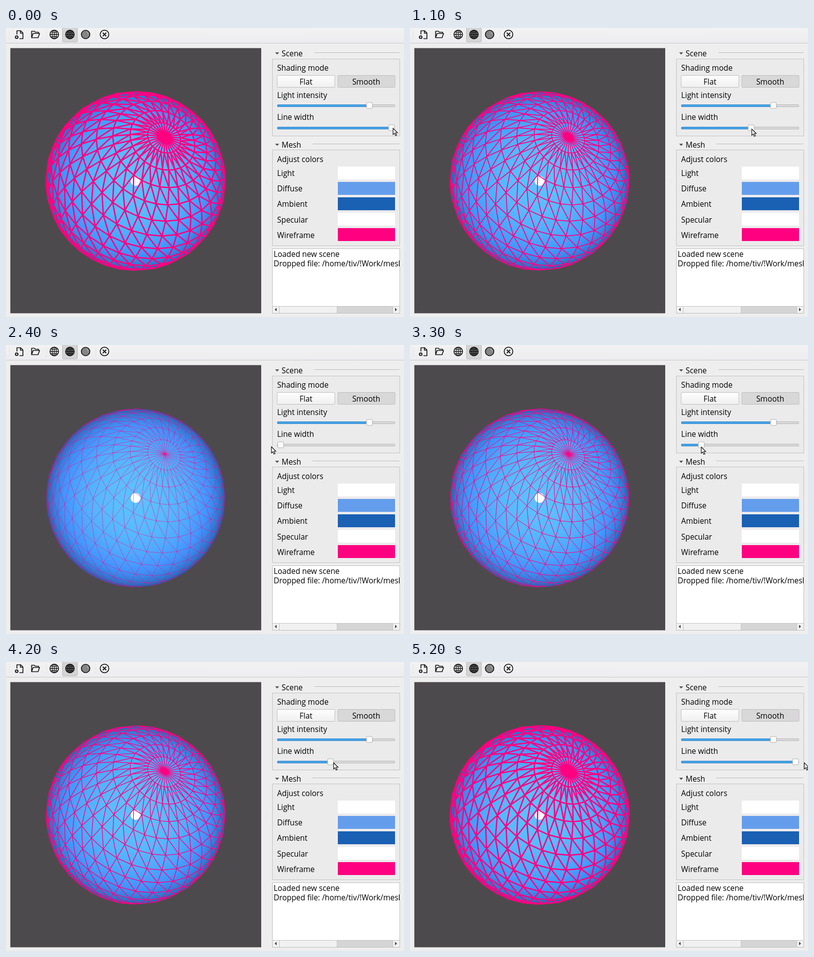
These frames come from a looping animation (800 by 582 pixels, 5300 ms). An HTML page:

```html
<!DOCTYPE html>
<html lang="en">
<head>
<meta charset="utf-8">
<title>Mesh viewer</title>
<style>
  html, body { margin: 0; width: 100%; height: 100%; overflow: hidden; background: #efeeef; }
  svg { display: block; width: 100vw; height: 100vh; }
  text { font: 500 15.4px "Open Sans", "Noto Sans", sans-serif; fill: #000; }
  .mid { text-anchor: middle; }
  .frame { fill: #ecebec; stroke: #c3c2c3; }
  .icon { fill: none; stroke: #151515; stroke-width: 1.7; stroke-linejoin: round; }
</style>
</head>
<body>
<svg viewBox="0 0 800 582">
  <defs>
    <radialGradient id="shade"></radialGradient>
    <linearGradient id="bar" x2="0" y2="1">
      <stop stop-color="#f3f2f3"/><stop offset="1" stop-color="#edecee"/>
    </linearGradient>
    <linearGradient id="button" x2="0" y2="1">
      <stop stop-color="#fdfdfd"/><stop offset="1" stop-color="#f0f0f0"/>
    </linearGradient>
    <clipPath id="logClip"><path d="M536 445H791V560H536z"/></clipPath>
    <g id="globe" class="icon">
      <circle r="8.6"/>
      <g stroke-width="1.3">
        <ellipse rx="4.4" ry="8.6"/>
        <path d="M0-8.6V8.6M-8.6 0H8.6M-7-5Q0-2.800 7-5M-7 5Q0 2.800 7 5"/>
      </g>
    </g>
    <g id="slider">
      <rect x="545.5" y="-2" width="236" height="4" rx="1.5" fill="#dcdbdc" stroke="#b5b4b5"/>
      <rect class="fill" x="545.5" y="-2" height="4" rx="1.5" fill="#45a5ea" stroke="#2f83c4"/>
    </g>
  </defs>

  <!-- toolbar -->
  <path fill="url(#bar)" d="M0 0H800V30H0z"/>
  <path stroke="#c9c8ca" d="M0 30.5H800"/>
  <path stroke="#c4c3c4" stroke-dasharray="1 3" d="M6.500 5V23M81.500 5V23M180.500 5V23"/>
  <rect x="113.500" y="-3" width="30" height="31" rx="2" fill="#d5d4d5" stroke="#b9b8b9"/>
  <g class="icon">
    <path d="M22 13V5.500H29.500L34 10V21.500H27M29 5.500V10.500H34"/>
    <circle cx="21.500" cy="18.500" r="3.600" fill="#151515" stroke="none"/>
    <path stroke="#fff" stroke-width="1.200" d="M19.500 18.500H23.500M21.500 16.500V20.500"/>
    <path d="M51.500 19.500V6.500H57L59 8.500H65.500V11M51.500 19.500L54.500 11H67.500L64.500 19.500z"/>
    <circle cx="160" cy="13" r="8.500" fill="#858585"/>
    <path stroke="#c8c8c8" stroke-width="1" d="M162 8Q165 9.500 165 13"/>
    <circle cx="198" cy="13" r="8.700"/>
    <path stroke-width="2" d="M194.500 9.500L201.500 16.500M201.500 9.500L194.500 16.500"/>
  </g>
  <use href="#globe" x="97" y="13"/>
  <circle cx="128.500" cy="13" r="8.600" fill="#666"/>
  <use href="#globe" x="128.500" y="13"/>

  <!-- viewport -->
  <path fill="#4d4a4d" d="M8.700 40.500H513V574.500H8.700z"/>
  <circle cx="260.500" cy="308" r="179.500" fill="url(#shade)"/>
  <circle cx="260.500" cy="308" r="10" fill="#fff"/>
  <path id="wire" fill="none" stroke="#ff0080" stroke-linejoin="round"/>
  <path stroke="#d0cfd0" stroke-dasharray="1 3" d="M524.500 303V314"/>

  <!-- side panel -->
  <rect class="frame" x="535.500" y="62.500" width="256" height="155"/>
  <rect class="frame" x="535.500" y="245.500" width="256" height="193"/>
  <path stroke="#bab9ba" d="M620 49.500H791M616 233.500H791"/>
  <path fill="#555" d="M541 49H549L545 53.500zM541 233H549L545 237.500z"/>
  <rect x="545" y="95.500" width="116" height="24" rx="1.500" fill="url(#button)" stroke="#bebdbe"/>
  <rect x="667" y="95.500" width="115" height="24" rx="1.500" fill="#d9d8d9" stroke="#bebdbe"/>
  <g id="labels"></g>
  <g id="swatches"></g>
  <g id="sliders"></g>

  <!-- log -->
  <rect x="535.500" y="444.500" width="256" height="130" fill="#fff" stroke="#bebdbe"/>
  <g clip-path="url(#logClip)">
    <text x="538" y="461">Loaded new scene</text>
    <text x="538" y="480">Dropped file: /home/tiv/!Work/meshes</text>
  </g>
  <path fill="#f2f1f2" d="M536 560H791V574H536z"/>
  <path fill="#d6d5d6" d="M665 560H778V574H665z"/>
  <path fill="none" stroke="#c3c2c3" d="M536 560.500H791M549.500 560V574M665.500 560V574M777.500 560V574"/>
  <path fill="#444" d="M544 563.500V570.500L540 567zM782 563.500V570.500L786 567z"/>

  <path id="cursor" fill="#fff" stroke="#111" stroke-width="1.200"
        d="M0 0V12.500L2.900 9.900L5.100 14.700L7.300 13.700L5.100 9H9z"/>
</svg>
<script>
const LOOP = 5300, STEP = 100, SLIDER_MIN = 552, NOTCH = 11.15, NOTCHES = 20;
const CX = 260.5, CY = 308, RADIUS = 180, SEGMENTS = 32, RINGS = 16;
// time, pointer x, pointer y
const POINTER = [
  [0, 778, 202], [100, 778, 202], [600, 757, 202], [1100, 687, 203.5], [1600, 596, 204.5],
  [2000, 553, 205], [2300, 534, 205], [2500, 533, 205], [3000, 566, 205.5], [3300, 585.5, 205.5],
  [3600, 620, 205], [4200, 658.5, 203], [4800, 773, 203], [5200, 792.5, 203], [LOOP, 792.5, 203]
];
const $ = id => document.getElementById(id);

function add(parent, tag, attrs, text = '') {
  const el = document.createElementNS('http://www.w3.org/2000/svg', tag);
  for (const key in attrs) el.setAttribute(key, attrs[key]);
  el.textContent = text;
  return parent.appendChild(el);
}

// Diffuse plus ambient light, coming from the viewer
for (let i = 0; i <= 24; i++) {
  const r = Math.sin(i / 24 * Math.PI / 2), z = Math.sqrt(Math.max(0, 1 - r * r));
  const rgb = [28 + 64 * z, 82 + 111 * z, 155 + 165 * z].map(v => Math.min(255, Math.round(v)));
  add($('shade'), 'stop', { offset: r, 'stop-color': `rgb(${rgb})` });
}

// Screen position of a vertex on a sphere whose pole leans toward the viewer
function vertex(ring, segment) {
  const px = 58.5 / RADIUS, py = -88.5 / RADIUS, lean = Math.hypot(px, py);
  const pz = Math.sqrt(1 - lean * lean), ax = -px / lean, ay = -py / lean;
  const polar = ring / RINGS * Math.PI, around = (segment + 0.5) / SEGMENTS * 2 * Math.PI;
  const c = Math.cos(polar), u = Math.sin(polar) * Math.cos(around) * pz, v = Math.sin(polar) * Math.sin(around);
  return [CX + RADIUS * (px * c + ax * u + ay * v), CY + RADIUS * (py * c + ay * u - ax * v)];
}

function triangle(a, b, c) {
  const area = (b[0] - a[0]) * (c[1] - a[1]) - (b[1] - a[1]) * (c[0] - a[0]);
  return area < -0.01 ? 'M' + [a, b, c].map(p => p.map(n => n.toFixed(2))).join('L') + 'z' : '';
}

let mesh = '';
for (let i = 0; i < RINGS; i++) {
  for (let j = 0; j < SEGMENTS; j++) {
    const a = vertex(i, j), c = vertex(i + 1, j + 1);
    mesh += triangle(a, vertex(i + 1, j), c) + triangle(a, c, vertex(i, j + 1));
  }
}
$('wire').setAttribute('d', mesh);

for (const [text, x, y, cls = ''] of [
  ['Scene', 554, 57], ['Shading mode', 545, 86], ['Flat', 603, 114, 'mid'], ['Smooth', 724, 114, 'mid'],
  ['Light intensity', 545, 140.5], ['Line width', 545, 185], ['Mesh', 554, 241], ['Adjust colors', 545, 270]
]) add($('labels'), 'text', { x, y, class: cls }, text);

Object.entries({ Light: '#fff', Diffuse: '#649dec', Ambient: '#1a60b3', Specular: '#fff', Wireframe: '#ff0080' })
  .forEach(([name, fill], i) => {
    add($('labels'), 'text', { x: 545, y: 298 + i * 31.2 }, name);
    add($('swatches'), 'rect', { x: 667, y: 279 + i * 31, width: 115, height: 26, fill });
  });

function makeSlider(y) {
  const group = $('slider').cloneNode(true);
  group.removeAttribute('id');
  group.setAttribute('transform', `translate(0 ${y})`);
  $('sliders').appendChild(group);
  const handle = add(group, 'rect', { y: -6.5, width: 12, height: 12, rx: 2, fill: '#fbfbfb', stroke: '#b0afb0' });
  return x => {
    group.querySelector('.fill').setAttribute('width', x - 545.5);
    handle.setAttribute('x', x - 6);
  };
}
makeSlider(156.5)(730.5);
const setLineWidth = makeSlider(201.5);

function pointerAt(t) {
  const i = POINTER.findIndex(p => p[0] > t), [a, b] = [POINTER[i - 1], POINTER[i]];
  const k = (t - a[0]) / (b[0] - a[0]);
  return [1, 2].map(n => a[n] + (b[n] - a[n]) * k);
}

function draw(now) {
  const t = Math.floor(now % LOOP / STEP) * STEP;
  const [x, y] = pointerAt(t);
  const value = Math.max(0, Math.min(NOTCHES, Math.round((x - 3 - SLIDER_MIN) / NOTCH)));
  setLineWidth(SLIDER_MIN + value * NOTCH);
  $('wire').setAttribute('stroke-width', 0.3 + 2.4 * value / NOTCHES);
  $('cursor').setAttribute('transform', `translate(${x} ${y})`);
  requestAnimationFrame(draw);
}
requestAnimationFrame(draw);
</script>
</body>
</html>
```
